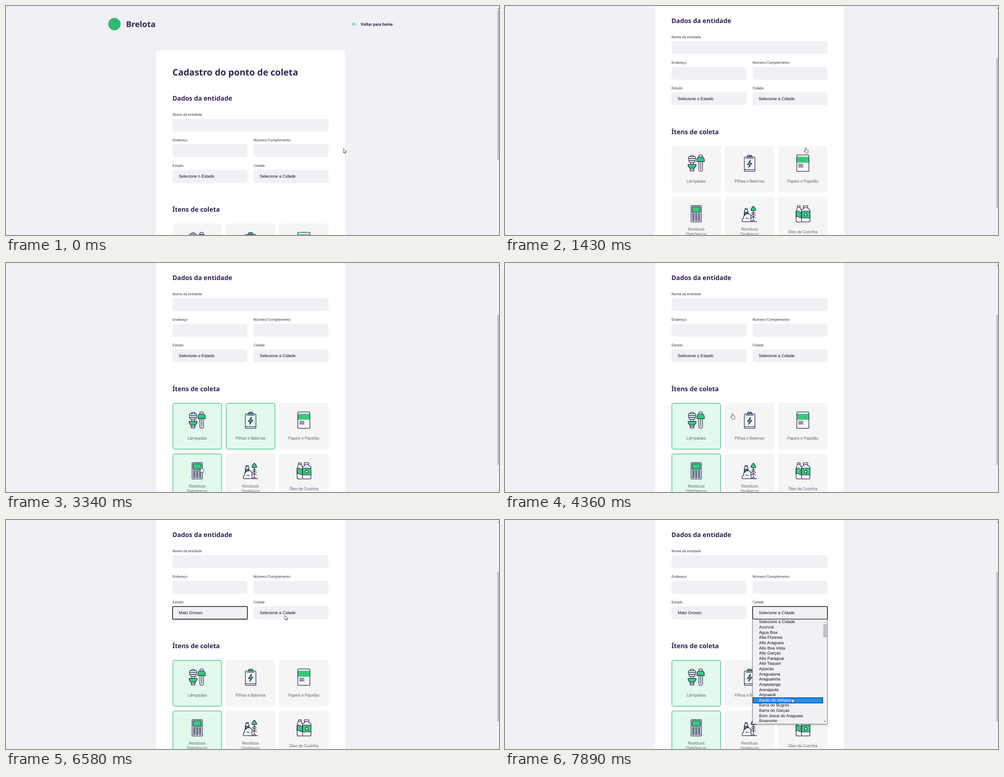
Animation, 1096 px wide and 511 px high, one loop 8 s. Source, as an HTML page:

```html
<!DOCTYPE html>
<html lang="pt-BR">
<head>
<meta charset="utf-8">
<title>Cadastro do ponto de coleta</title>
<style>
html, body { margin: 0; width: 100%; height: 100%; overflow: hidden; background: #f0f0f5; }
svg { display: block; width: 1096px; height: 511px; text-rendering: geometricPrecision; }
.head { font: 700 14.3px "Noto Sans", sans-serif; fill: #322153; }
.label { font: 400 8px Roboto, sans-serif; fill: #3c3945; }
.item { font: 300 9.22px Roboto, sans-serif; fill: #2b2835; text-anchor: middle; }
.back { font: 700 9.22px Roboto, sans-serif; fill: #322153; }
.opt { font: 9.22px "Liberation Sans", Arial, sans-serif; fill: #111; }
.icon path { fill: none; stroke: #2a1e50; stroke-width: 1.25; stroke-linejoin: round; stroke-linecap: round; }
.icon .green { fill: #34cb79; }
.icon .plain { fill: #34cb79; stroke: none; }
.list { filter: drop-shadow(0 1.5px 1.5px #0006); }
.cursor { fill: #fff; stroke: #222; stroke-width: .8; stroke-linejoin: round; }
</style>
</head>
<body>
<svg id="stage" viewBox="0 0 1096 511"></svg>
<script>
const LOOP = 8000, STEP = 57.6, ROW = 11.63, LIST_TOP = 222;
const rect = (x, y, w, h, fill, r = 0, more = '') =>
  `<rect x="${x}" y="${y}" width="${w}" height="${h}" rx="${r}" fill="${fill}" ${more}/>`;
const text = (x, y, cls, str, more = '') => `<text x="${x}" y="${y}" class="${cls}" ${more}>${str}</text>`;
const path = (d, more = '') => `<path d="${d}" ${more}/>`;
const box = (x, y, w, h, r) =>
  `M${x + r} ${y}h${w - 2 * r}q${r} 0 ${r} ${r}v${h - 2 * r}q0 ${r} ${-r} ${r}h${2 * r - w}q${-r} 0 ${-r} ${-r}v${2 * r - h}q0 ${-r} ${r} ${-r}z`;

let keys = '';
for (let i = 0; i < 12; i++) keys += box(-8.5 + 6.5 * (i % 3), -.8 + 4.4 * (i / 3 | 0), 4, 2.2, .6);

// Each item: label lines, outlined green shape, line work, plain green shape
const items = [
  [['Lâmpadas'],
    'M-18 2.5H-.5V6L-4 11H-14.5L-18 6ZM1.5-3.5v-3q0-7 5-7.5h6.5q5 .5 5 7.5v3z',
    'M-13-14.5q0-3 2-3h4q2 0 2 3' + box(-17.5, -14.5, 16.5, 4, 1.8) + box(-17.5, -10.2, 16.5, 4, 1.8) +
    box(-16, -6, 13.5, 4, 1.8) + 'M-12-2v4.5M-6.5-2v4.5M-13.5 11v4.5q0 2 2 2h4.5q2 0 2-2V11M-13.5 14H-5' +
    'M6-14v-3q0-1.5 2-1.5h3.5q2 0 2 1.5v3M6-3.5V14.5q0 3.5 4 3.5t4-3.5V-3.5M10-3.5V14', ''],
  [['Pilhas e Baterias'],
    'M-5-14q0-4 3-4H2.5q3 0 3 4zM2-7-5 3H-.5L-2 9.5 5.5 0H1z',
    box(-11.5, -14, 23.5, 32, 2) + 'M-11.5 14.5H12M-8-11H8.5', ''],
  [['Papeis e Papelão'], '',
    box(-13.5, -18.5, 27, 36.5, 2) + 'M-9.5 2.5H.5M-9.5 5.4H.5M-9.5 8.3H.5', 'M-13-14.5H13V-1.2H-13z'],
  [['Resíduos', 'Eletrônicos'], box(-9, -16, 18, 12.5, 1), box(-11.5, -18.5, 23, 36.5, 2) + keys, ''],
  [['Resíduos', 'Orgânicos'],
    'M8.5-17.5q5 5 5.5 9.5-5.5 2-11 0 .5-4.5 5.5-9.5zM-11.5-4h8V0q-4-1-8 4z',
    'M8.5-7V14M4.5-1l4-3 4 3M4 4l4.5-4 4.5 4M4 9l4.5-4 4.5 4M4.5 17.5l4-4 4 4z' +
    'M-16 17.5q-1.5-6 3-8-1-7 4-9 4-4 9 0 5 3 2.5 9 2 4 1 8M-16 17.5H16M-8 10q3-2 5 1' +
    'M-11.5 2v-8l1.5-3v-3h5v3l1.5 3v6M-10-9.5h5', ''],
  [['Óleo de Cozinha'],
    'M-15-5q4-3 7 0t5 0V7q-3 3-6 0t-6 0z',
    'M-12-18h6v4l3 6M-12-18v4l-3 8V15q0 3 3 3h8M-12-14.5h6' +
    'M1-18h10v4H1zM2-14v2q-5 2-5 5V15q0 3 3 3H13q3 0 3-3V-7q0-3-5-5v-2M-3-6H16M-3 9H16' +
    'M6.5-2.5q-6 7 0 7t0-7z', 'M-3-5.5H16V8.5H-3zM6.5-2.5q-6 7 0 7t0-7z']
];

const states = ['Selecione o Estado', 'Acre', 'Alagoas', 'Amapá', 'Amazonas', 'Bahia', 'Ceará', 'Distrito Federal',
  'Espírito Santo', 'Goiás', 'Maranhão', 'Mato Grosso', 'Mato Grosso do Sul', 'Minas Gerais', 'Pará', 'Paraíba',
  'Paraná', 'Pernambuco', 'Piauí', 'Rio de Janeiro'];
const cities = ['Selecione a Cidade', 'Acorizal', 'Água Boa', 'Alta Floresta', 'Alto Araguaia', 'Alto Boa Vista',
  'Alto Garças', 'Alto Paraguai', 'Alto Taquari', 'Apiacás', 'Araguaiana', 'Araguainha', 'Araputanga', 'Arenápolis',
  'Aripuanã', 'Barão de Melgaço', 'Barra do Bugres', 'Barra do Garças', 'Bom Jesus do Araguaia', 'Brasnorte'];

const field = (x, y, w, label) => text(x, y - 6.9, 'label', label) + rect(x + .2, y, w, 28.6, '#f0f0f5', 4.6);
const focusRing = (id, x) => rect(x + .2, 365.8, 166.2, 28.4, 'none', 2, `id="${id}" stroke="#101010" stroke-width="1.6"`);

function card([lines, green, line, plain], i) {
  const x = 370.4 + 118.5 * (i % 3), y = 485.3 + 113 * (i / 3 | 0), mid = x + 54.7;
  const art = path(plain, 'class="plain" fill-rule="evenodd"') + path(green, 'class="green"') + path(line);
  const first = lines.length > 1 ? 75.6 : 81.7;
  return rect(x, y, 109.5, 103.5, '#f5f5f5', 4.6) +
    rect(x + .6, y + .6, 108.3, 102.3, '#e1faec', 4.2, `id="pick${i}" stroke="#2fbf74" stroke-width="1.2"`) +
    `<g class="icon" transform="translate(${mid} ${y + 38.4})">${art}</g>` +
    lines.map((s, n) => text(mid, y + first + 10.9 * n, 'item', s)).join('');
}

function list(id, x, names, thumb) {
  return `<g id="${id}"><g class="list">${rect(x + .5, 221.8, 166, 233.4, '#f0f0f5', 0, 'stroke="#777" stroke-width=".8"')}</g>` +
    rect(x + 157, 222.3, 8.8, 232.5, '#f1f1f1') + rect(x + 157.5, 232, 7.8, thumb, '#c1c1c1') +
    path(`M${x + 159.3} 229l2-2.2 2 2.2z`, 'fill="#a3a3a3"') + path(`M${x + 159.3} 448.5l2 2.2 2-2.2z`, 'fill="#505050"') +
    rect(x + 1.5, 0, 155, ROW, '#1e90ff', 0, 'class="hot" stroke="#101010"') +
    names.map((s, k) => text(x + 14.8, (LIST_TOP + 8.4 + ROW * k).toFixed(2), 'opt', s)).join('') + '</g>';
}

const cursors = {
  arrow: 'M0 0V9.8L2.3 7.7 3.8 11 5.3 10.3 3.9 7.2H7z',
  beam: 'M-2-4.8H-.4L0-4.4.4-4.8H2M0-4.4V4.4M-2 4.8H-.4L0 4.4.4 4.8H2',
  hand: 'M-1 1q1-1.6 2 0V4.5L4.6 5.4q1.4.6 1.2 2.4L4.8 12.5H-.2L-3.6 8q-.4-1.6 1.2-.8L-1 8.2z'
};

stage.innerHTML = '<g id="page">' +
  '<circle cx="241" cy="40.5" r="13.8" fill="#34b772"/>' +
  text(267, 47, 'head', 'Brelota', 'style="font-size:17.9px"') +
  path('M779.5 40.5H770.5M774.5 36.3L770.3 40.5 774.5 44.7', 'fill="none" stroke="#34cb79" stroke-width="1.2"') +
  text(788.6, 43.8, 'back', 'Voltar para home') +
  rect(333.8, 98.9, 419.6, 900, '#fff', 4.6) +
  text(370, 155.2, 'head', 'Cadastro do ponto de coleta', 'style="font-size:19.95px"') +
  text(370, 210.5, 'head', 'Dados da entidade') +
  field(370.2, 251.5, 346.6, 'Nome da entidade') +
  field(370.2, 308.5, 166.4, 'Endereço') + field(550.3, 308.5, 166.4, 'Número/Complemento') +
  field(370.2, 365.6, 166.4, 'Estado') + field(550.3, 365.6, 166.4, 'Cidade') +
  focusRing('ringState', 370.2) + focusRing('ringCity', 550.3) +
  text(384, 382.8, 'opt', '', 'id="state"') + text(564, 382.8, 'opt', cities[0]) +
  text(370, 458.6, 'head', 'Ítens de coleta') + items.map(card).join('') + '</g>' +
  rect(1091.5, 0, 5, 511, '#f1f1f1') + rect(1092.1, 9.6, 4, 334, '#c1c1c1', 0, 'id="thumb"') +
  path('M1093.5 6.5L1096 3.8V6.5z', 'fill="#505050"') +
  list('stateList', 370, states, 152) + list('cityList', 550, cities, 30) +
  path('', 'id="cursor" class="cursor"');

const $ = id => document.getElementById(id);
const ease = (t, a, b) => { const u = Math.min(1, Math.max(0, (t - a) / (b - a))); return u * u * (3 - 2 * u); };
const show = (el, on) => el.setAttribute('visibility', on ? 'visible' : 'hidden');

// Pointer stops: time, x, y and the shape worn from then on
const stops = [
  [0, 750, 318, 'arrow'], [50, 750, 318, 'arrow'], [180, 714, 317, 'beam'], [330, 673, 314.3, 'beam'],
  [1380, 673, 314.3, 'hand'], [1760, 579, 345.5, 'hand'], [1800, 579, 345.5, 'hand'], [1850, 565.5, 352.3, 'hand'],
  [2080, 565.5, 352.3, 'hand'], [2370, 440, 372, 'hand'], [2500, 440, 372, 'hand'], [2780, 434, 454.3, 'hand'],
  [3340, 434, 454.3, 'hand'], [3650, 405, 415, 'hand'], [4130, 514, 359, 'hand'], [4300, 514, 359, 'hand'],
  [4430, 495, 308, 'arrow'], [4680, 455, 210, 'arrow'], [4800, 455, 210, 'arrow'], [4970, 454, 238, 'arrow'],
  [5100, 447, 334.5, 'arrow'], [5330, 440, 354, 'arrow'], [5800, 440, 354, 'arrow'], [6250, 635, 222, 'arrow'],
  [6450, 620, 213, 'arrow'], [6800, 620, 213, 'arrow'], [7320, 616.5, 332.5, 'arrow'], [7370, 616.5, 332.5, 'arrow'],
  [7450, 615.5, 334, 'arrow'], [7680, 615.5, 334, 'arrow'], [7890, 638, 398.5, 'arrow'], [LOOP, 638, 398.5, 'arrow']
];
// Card index, time picked, time dropped
const picks = [[0, 2420, 1e5], [1, 1980, 4230], [3, 2850, 1e5]];
const OPEN_STATE = 4740, CHOOSE = 5750, OPEN_CITY = 6650;

function hover(id, y, on) {
  const el = $(id);
  show(el, on);
  if (!on) return;
  const row = Math.max(0, Math.floor((y - LIST_TOP) / ROW));
  const edge = k => Math.round(LIST_TOP + ROW * k) + .5;
  const hot = el.querySelector('.hot');
  hot.setAttribute('y', edge(row));
  hot.setAttribute('height', edge(row + 1) - edge(row));
  el.querySelectorAll('text').forEach((n, k) => n.style.fill = k === row ? '#fff' : '');
}

function draw(now) {
  const t = now % LOOP;
  const scroll = STEP * (ease(t, 550, 750) + ease(t, 980, 1180) + ease(t, 1180, 1380));
  $('page').setAttribute('transform', `translate(0 ${-scroll})`);
  $('thumb').setAttribute('y', 9.6 + scroll * .616);

  for (let i = 0; i < items.length; i++) {
    const p = picks.find(p => p[0] === i);
    $('pick' + i).setAttribute('opacity', p ? ease(t, p[1], p[1] + 90) - ease(t, p[2], p[2] + 90) : 0);
  }

  const n = stops.findLastIndex(s => s[0] <= t), [ta, xa, ya, kind] = stops[n], [tb, xb, yb] = stops[n + 1];
  const u = ease(t, ta, tb), x = xa + (xb - xa) * u, y = ya + (yb - ya) * u;
  const cursor = $('cursor');
  cursor.setAttribute('d', cursors[kind]);
  cursor.setAttribute('transform', `translate(${x} ${y})`);
  cursor.style.fill = kind === 'beam' ? 'none' : '';

  show($('ringState'), t >= OPEN_STATE && t < OPEN_CITY);
  show($('ringCity'), t >= OPEN_CITY);
  $('state').textContent = states[t < CHOOSE ? 0 : 11];
  hover('stateList', y, t >= OPEN_STATE && t < CHOOSE);
  hover('cityList', y, t >= OPEN_CITY);
}

const start = performance.now();
(function tick() {
  draw(performance.now() - start);
  requestAnimationFrame(tick);
})();
</script>
</body>
</html>
```
